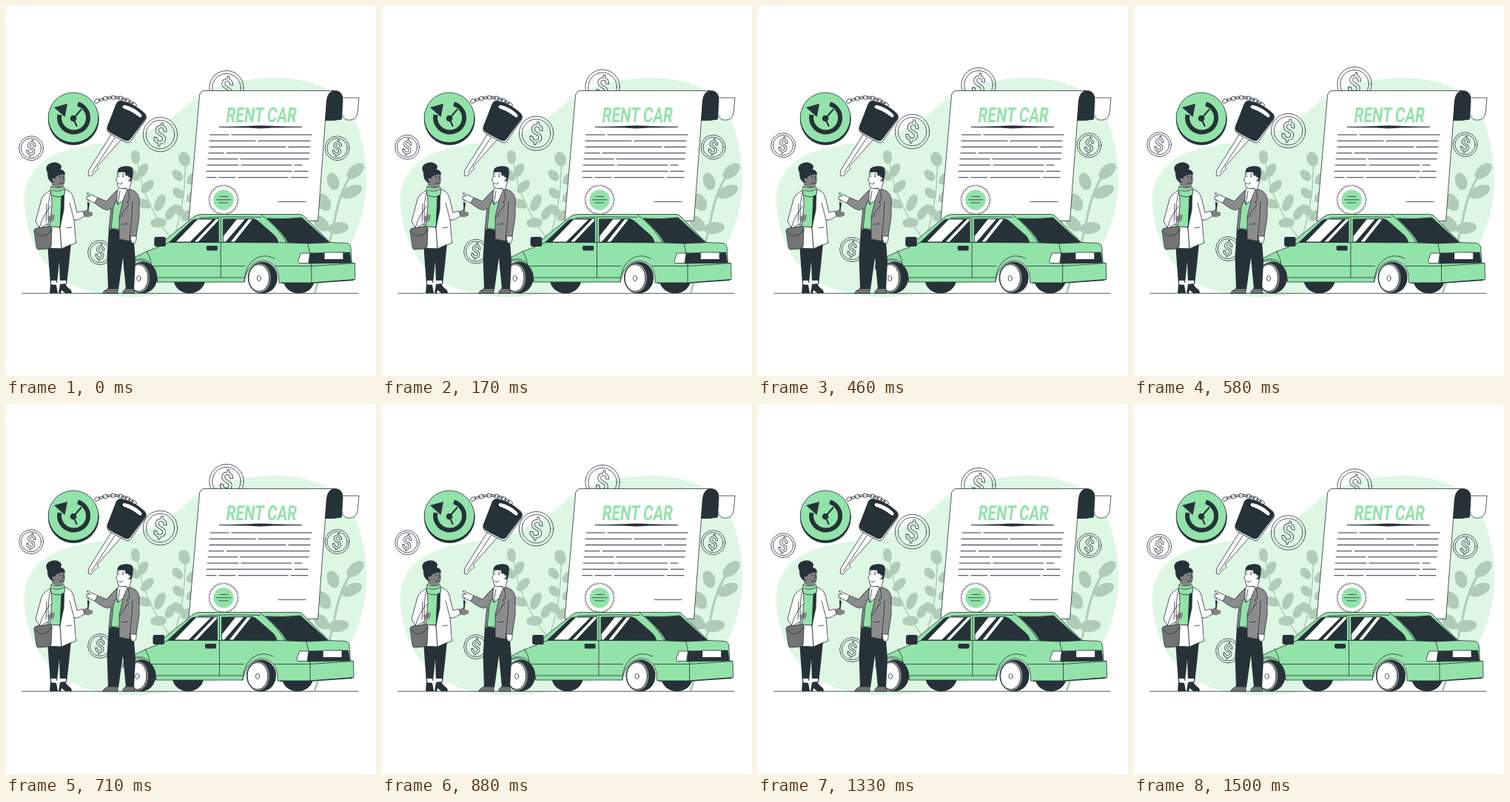
Write an HTML page that moves like this. It is 500 px wide and 500 px high and loops after 1.54 s.

```html
<!DOCTYPE html>
<html lang="en">
<head>
<meta charset="utf-8">
<title>Rent car</title>
<style>
html, body { margin: 0; width: 100%; height: 100%; overflow: hidden; background: #fff; }
svg { display: block; width: 100vw; height: 100vh; }
.o { stroke: #263238; stroke-width: .8; stroke-linejoin: round; stroke-linecap: round; }
.g { fill: #92e3a9; }
.d { fill: #263238; }
.w { fill: #fff; }
.n { fill: none; }
.s { fill: #808080; }
.j { fill: #8c8c8c; }
.b { fill: #737373; }
.title { font: 700 28px Roboto, sans-serif; fill: #92e3a9; text-anchor: middle; }
.cash { font: 500 34px Roboto, sans-serif; text-anchor: middle; }
</style>
</head>
<body>
<svg viewBox="0 0 500 500">
  <path fill="#def7e5" d="M25 262C25 216 64 195 112 188C166 181 208 168 240 138C272 107 320 97 366 97C420 98 458 118 472 154C482 180 488 210 487 242C486 276 474 312 455 340C425 367 350 360 288 373C250 382 224 392 176 393C122 394 82 381 55 350C35 326 25 294 25 262Z"/>
  <path class="o n" d="M22 388.3H476"/>
  <g id="plants" fill="#b0cbb8"></g>
  <g id="coins"></g>

  <!-- contract -->
  <path class="o w" d="M455 124H477L475 145Q473 154 465 154H461Q454 152 453 142Z"/>
  <path class="o w" d="M247 290L261.500 121Q262.500 114.500 269 114.500H444Q435 116 433.500 128L421.500 290Z"/>
  <path class="o d" d="M431.500 154.500L433.500 128Q435 114.500 445 114.500Q455 115 455 127L453.500 153Q442 155.500 431.500 154.500Z"/>
  <text class="title" transform="matrix(.727 0 -.12 1 344.300 156.500)">RENT CAR</text>
  <path class="d" d="M288 163.100Q310 163 326 162.300Q344 160.800 362 162.300Q380 163 400 163.100V163.900Q378 164 362 164.600Q344 166.200 326 164.600Q310 164 288 163.900Z"/>
  <path id="lines" class="o n" style="stroke-width:1.100"/>
  <path class="o n" d="M368 264.500H405"/>
  <path id="seal" class="o w"/>
  <circle class="g" cx="294" cy="262" r="13.700"/>
  <path class="o n" d="M289 257.500H300M284.500 261.800H304M288 265.800H300"/>

  <!-- badge, chain and key -->
  <circle class="o d" cx="91.300" cy="153.600" r="34"/>
  <circle class="o g" cx="91" cy="150.800" r="33.800"/>
  <path d="M72.500 147A19.500 19.500 0 1 0 97 132.300" fill="none" stroke="#263238" stroke-width="6"/>
  <path class="d" d="M65 137L83 132L79.500 150Z"/>
  <circle class="d" cx="91" cy="152" r="4.300"/>
  <path class="n" stroke="#263238" stroke-width="2" stroke-linecap="round" d="M91 152L101.500 140M91 152L95.500 162"/>
  <g id="chain"></g>
  <path class="o w" d="M143 173L156 180L126 214L123 217L125 220L119 225L115 230L111 229L112 222Z"/>
  <path class="o n" d="M147 178L116 225"/>
  <g transform="translate(161.500 155.800) rotate(28)">
    <path class="o w" d="M-15 -21Q0 -25 17 -21Q23 -20 23 -14L19 20Q18 25 12 25H-10Q-17 24 -18 18L-21 -14Q-21 -20 -15 -21Z"/>
    <path class="o d" d="M-16 -22Q0 -26 16 -22Q22 -21 22 -15L17 18Q16 23 10 23H-10Q-17 23 -18 17L-22 -15Q-22 -21 -16 -22Z"/>
    <path class="w" d="M-10 -19Q2 -22 14 -18.500Q17 -17 16 -14.500Q15 -13.500 12 -14Q1 -16 -8 -14.500Q-13 -14 -13 -16.500Q-12.500 -18.500 -10 -19Z"/>
  </g>

  <g id="car">
    <ellipse class="d" cx="248" cy="370" rx="21" ry="18.300"/>
    <ellipse class="d" cx="396" cy="370" rx="21" ry="18.300"/>
    <path class="d" d="M372 365H470L470 371L412 375H372Z"/>
    <path class="o g" d="M160 350Q168 340 205 326L212 319L254 285Q258 281.600 264 281.500H398Q402 282 404 285L438 319.500L460 320.500Q465 321 466 326L467.500 347.500H471.500L472 369.500L412 374H369Q370 346 347 344Q327 346 322 373H205Q204 346 181 344Q168 345 160 356Z"/>
    <path class="o d" d="M221 319L250 291.500Q253 288 258 288L287.500 287.300V319Z"/>
    <path class="w" d="M230 318.500L259 288.500H279L249 318.500ZM255 318.500L284 288H287V290L260 318.500Z"/>
    <path class="o d" d="M293.500 319V288L334 287.500Q338 288 342 291.500L363 310Q367 314 368 319.500Z"/>
    <path class="w" d="M294 311L312 288.300H323L297 318.500H294ZM304 318.500L328 288.300H333L309 318.500Z"/>
    <path class="o d" d="M353 287Q376 288.500 400 286L437 319.500L408 320.500L381 319.500Q376 308 353 287Z"/>
    <path class="o n" d="M205 326L221 319.500H370L408 321L438 319.500M408 321L411 334M345 282Q366 297 379 319.500M290.400 287V367M196 351.500H323M364 351.500H413L471 347.500M206 367H322M190 331Q196 341 197 351M262 286.500Q300 284 345 285.500M413 348V374"/>
    <path class="o n" d="M322 373Q323 348 340 340Q350 335 363 341M161 352Q172 340 185 342Q201 345 205 373"/>
    <path class="d" d="M203 312H214Q216 312 216 314V323Q216 325 213 325H203Q200.500 325 200.500 322V315Q200.500 312 203 312Z"/>
    <path class="d" d="M272 324H285Q286 324 286 326V329Q286 330.500 284 330.500H273Q271 330.500 271 328V326Q271 324 272 324Z"/>
    <path class="o d" d="M410 334L464.500 333L466.500 347L410 348Z"/>
    <path class="o w" d="M399 334H411L409 347.500H396Q394 347 395.500 343Z"/>
    <path class="o w" d="M430.500 333H456V342.500H430.500Z"/>
    <g id="wheels"></g>
  </g>

  <!-- woman -->
  <path class="d" d="M56 322L88 320L85 350L82 376H73L72 345L69 374L60 376Z"/>
  <path class="w" d="M61 371H68V378H61ZM73 371H81V378H73Z"/>
  <path class="d" d="M60 376L68 377L70 388H59ZM73 376L80 375Q82 380 88 384L89 388H80L75 384L74 388H71Z"/>
  <path class="d" d="M62 250H79L81 290L72 300H60Z"/>
  <path class="o g" d="M61 252L75 254L73 299H59Z"/>
  <path class="s" d="M103 278L110 275L113 278L117 279L117 283L111 285.500L103 284Z"/>
  <path class="o w" d="M61 249Q51 253 48 261L40 291L46 301L56 294L54 327L75 328L73 299L59 298L62 270Z"/>
  <path class="o w" d="M79 247L85 250Q90 253 92 263L96 279L104 277L106 284L97 289L92 289L94 316H75L73 299L78 276Z"/>
  <path class="o w" d="M73 299L75 328L94 319L93 310Z" style="stroke:none"/>
  <path class="o n" d="M94 316L95 320L75 328L73 299M86 266L92 289M55 267L54 291M79 249L75 282L73 299M82 300L89 299"/>
  <path class="o n" d="M60 251Q55 275 58 299M45 300Q50 282 61 270"/>
  <path class="o b" d="M38 303Q39 300 42 300L59 298Q62 298 62 301L61 325Q60 328 56 328L45 329Q41 329 41 325Z"/>
  <path class="o n" d="M39 304Q51 319 62 301"/>
  <path class="s" d="M56 286L62 281L66 283L64 290L58 292Z"/>
  <path class="s" d="M62 228Q69 222 78 225Q81 233 79 240Q75 248 67 245L62 243Z"/>
  <path class="d" d="M56 225Q52 219 57 214Q63 210 70 212Q77 215 74 221Q80 222 80 228Q72 226 67 231L65 238L62 239Q55 234 56 225Z"/>
  <circle class="s" cx="64.500" cy="235" r="2.300"/>
  <path class="o n" d="M70 229L73 228M77 228L79 228M77 231L78.500 235L76 235.500M72 239Q75 241 78 239"/>
  <circle class="d" cx="73" cy="231.500" r=".9"/><circle class="d" cx="78" cy="231" r=".8"/>
  <path class="o g" d="M61 244Q69 248 78 244Q81 250 79 255Q70 261 61 255Q60 250 61 244Z"/>
  <path class="o n" d="M63 249Q70 252 78 248"/>

  <!-- man -->
  <path class="d" d="M139 300L172 306L175 345L173 383H162L158 340L152 383H138L136.500 340Z"/>
  <path class="o b" d="M138 382H151V388.300H131Q131 385 138 382ZM162 382H173L174 388.300H158Q157 385 162 382Z"/>
  <path class="o g" d="M147 260L152 268L161 256L157 301H140L142 275Z"/>
  <path class="o w" d="M153 245L166 248L159 262L151 268L148 256Z"/>
  <path class="o n" d="M154 250L151 268"/>
  <path class="o w" d="M124 259L115 255Q111 251 109 253L114 257L109 257L109 261L115 264L121 267Z"/>
  <path class="o j" d="M150 249Q142 256 136 264L124 259L120 266Q130 275 138 276L142 273L139 302L142 303L145 272L150 260Z"/>
  <path class="o j" d="M165 247Q178 249 180 260L180 285L176 311L168 312L167 318L153 315L153 285L159 260Z"/>
  <path class="o n" d="M165 248L167 262L163 265L166 268L154 286M171 265L170 287L167 313M157 295L165 294"/>
  <path class="o w" d="M168 311L176 311Q177 318 173 321Q168 321 168 311Z"/>
  <path class="o w" d="M151 223L150 232L148.500 236L150.500 238Q150 246 156 247L161 246L166 249L170 236L167 224Z"/>
  <path class="d" d="M151 225Q150 218 157 217Q167 215 171 219Q173 225 170 235L167 238L165 229L162 230L161 225Q157 224 151 225Z"/>
  <path class="o w" d="M165 231Q169 230 168 234Q167 237 165 236"/>
  <path class="o n" d="M151 227H153M157 227L160 227.500M152 240Q155 242 158 239"/>
  <circle class="d" cx="152.500" cy="230" r=".8"/><circle class="d" cx="158" cy="230" r=".9"/>
  <path class="o n" d="M111 261V267"/>
  <path class="d" d="M109.500 266H113L112.500 270L111.500 277H110L110.300 270Z"/>
</svg>
<script>
const NS = 'http://www.w3.org/2000/svg';
const $ = id => document.getElementById(id);
function add(parent, tag, attrs) {
  const el = document.createElementNS(NS, tag);
  for (const k in attrs) el.setAttribute(k, attrs[k]);
  return parent.appendChild(el);
}
function ellipse(parent, cls, cx, cy, rx, ry, turn = 0) {
  return add(parent, 'ellipse', { class: cls, cx, cy, rx, ry, transform: `rotate(${turn} ${cx} ${cy})` });
}

// Coins: centre x, resting y, radius
for (const [x, y, r] of [[298, 111, 23.2], [208.5, 174, 23.2], [34, 192.6, 16.4], [447.5, 192.6, 16.4], [127, 333.5, 16.4]]) {
  const g = add($('coins'), 'g', { transform: `translate(${x} ${y})` });
  add(g, 'circle', { class: 'o n', r });
  add(g, 'circle', { class: 'o n', r: r * .83 });
  const k = r / 23.2;
  const sign = add(g, 'text', {
    class: 'o n cash', y: 12, transform: `rotate(8) scale(${k})`, style: `stroke-width:${.8 / k}`
  });
  sign.textContent = '$';
}

// Plants: stems, then leaves as x, y, length, width, turn
for (const d of ['M177 203Q181 260 224 316', 'M242 205Q244 260 226 316', 'M417 388Q436 330 445 285Q452 245 474 218'])
  add($('plants'), 'path', { d, fill: 'none', stroke: '#b0cbb8', 'stroke-width': d.startsWith('M417') ? 3 : 1.6 });
const leaves = [
  [175, 204, 9, 6, 85], [185, 222, 10, 6, -60], [172, 228, 10, 6, 45], [191, 244, 11, 6, -45],
  [186, 267, 11, 6, 20], [208, 266, 12, 6.5, -65], [206, 293, 11, 6.5, -5], [222, 280, 10, 6, -60],
  [241, 207, 10, 7.5, 70], [232, 229, 9, 6, 45], [252, 233, 10, 6, -50], [233, 253, 9, 6, 40],
  [252, 257, 10, 6, -45], [233, 276, 10, 6, 40], [245, 283, 10, 6, -40],
  [472, 223, 14, 8, -42], [442, 237, 12, 8, 70], [467, 251, 15, 8, -24], [429, 265, 13, 9, 55],
  [457, 275, 0, 0, 0], [426, 294, 13, 8, 45], [449, 300, 14, 8, -8], [425, 316, 10, 7, 40]
];
for (const leaf of leaves) ellipse($('plants'), '', ...leaf);

// Contract rows: y, then start and end of every dash
const rows = [
  [174, 276, 301, 305, 413], [182.3, 275, 337, 341, 411], [190.5, 275, 378, 382, 411],
  [198.7, 274, 294, 298, 410], [206.8, 273, 313, 317, 409], [215, 272, 314, 318, 386, 390, 400],
  [223.300, 271, 386, 390, 408], [231.800, 271, 284, 288, 310, 314, 381, 385, 408]
];
$('lines').setAttribute('d', rows.map(([y, ...xs]) =>
  xs.map((x, i) => `${i % 2 ? 'L' : 'M'}${x} ${y}`).join('')).join(''));

// Scalloped edge of the seal
let edge = '';
for (let i = 0; i < 240; i++) {
  const a = i / 240 * 2 * Math.PI, r = 19.4 + .8 * Math.cos(a * 30);
  edge += `${i ? 'L' : 'M'}${(294 + r * Math.cos(a)).toFixed(2)} ${(262 + r * Math.sin(a)).toFixed(2)}`;
}
$('seal').setAttribute('d', edge + 'Z');

// Chain links along a curve
for (let i = 0; i < 11; i++) {
  const t = i / 10, u = 1 - t;
  const x = 123 * u * u + 2 * 152 * u * t + 173 * t * t;
  const y = 128.5 * u * u + 2 * 117 * u * t + 133 * t * t;
  const turn = Math.atan2(-11.5 * u + 16 * t, 29 * u + 21 * t) * 180 / Math.PI;
  ellipse($('chain'), 'o n', x, y, 3.7, i % 2 ? 1.4 : 2.5, turn);
}

// Near wheels
for (const [x, rx] of [[179.5, 12.5], [342, 13.8]]) {
  const g = $('wheels');
  ellipse(g, 'd', x + 5, 367, 20, 21.5);
  ellipse(g, 'o j', x + 1, 367.5, rx + 1.6, 20);
  ellipse(g, 'o w', x, 367.5, rx, 18.2);
  ellipse(g, 'o w', x, 368, 2.6, 3.6);
}

const LOOP = 1540, LEAD = 40, UNIT = 2 / 3;
const shake = [0, -1, 2, -4, 4, -4, 4, -4, 2, -1, 0];
const start = performance.now();

function draw(ms) {
  const p = ((ms + LEAD) % LOOP) / LOOP;
  const i = Math.floor(p * 10);
  const dx = shake[i] + (shake[i + 1] - shake[i]) * (p * 10 - i);
  const dy = -10 * (1 - Math.abs(1 - 2 * p));
  $('car').setAttribute('transform', `translate(${dx * UNIT} 0)`);
  $('coins').setAttribute('transform', `translate(0 ${dy * UNIT})`);
}
function tick() {
  draw(performance.now() - start);
  requestAnimationFrame(tick);
}
draw(0);
requestAnimationFrame(tick);
</script>
</body>
</html>
```
